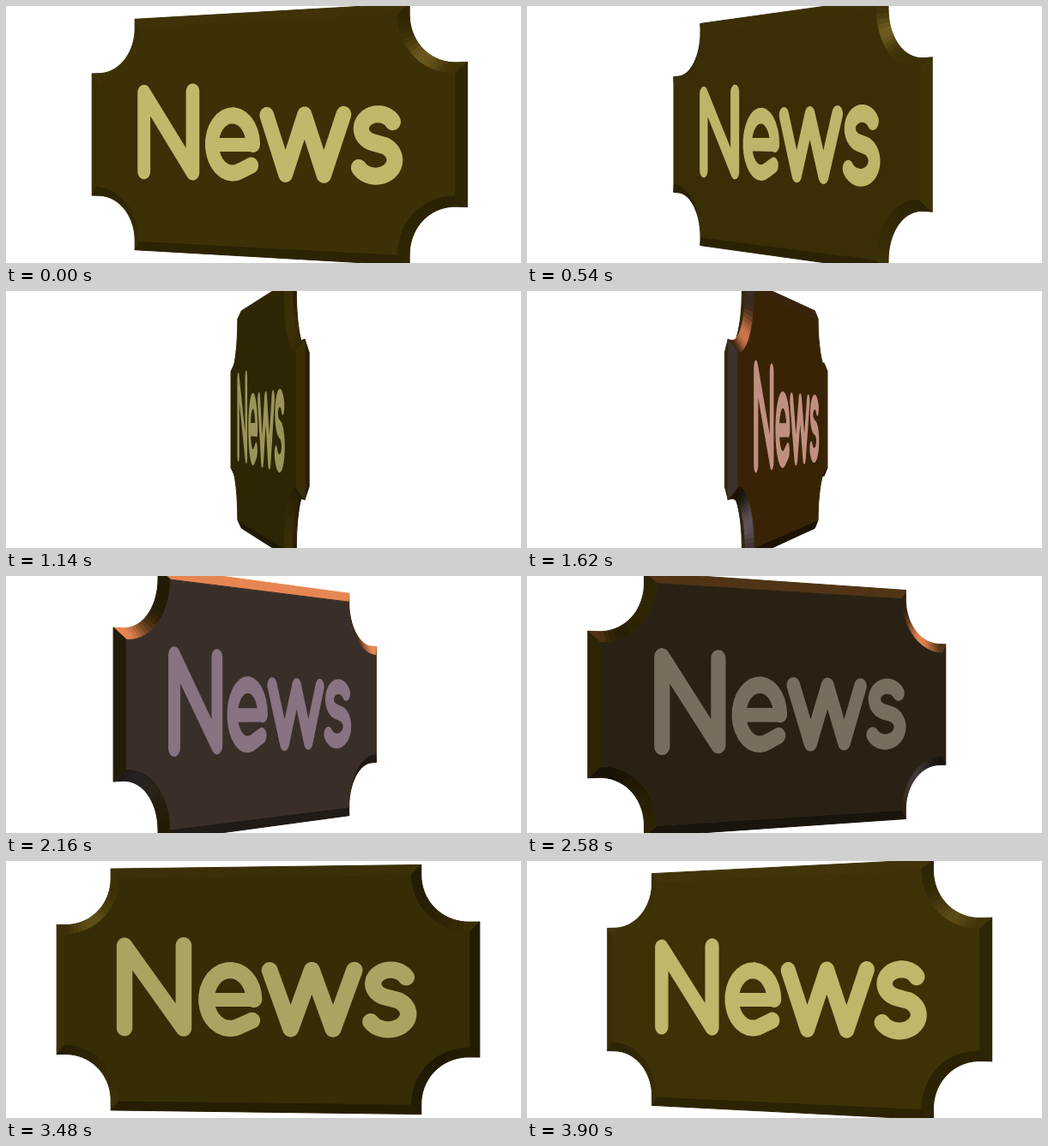
An HTML page with a canvas that plays this animation: 600 by 300 pixels, repeating every 3.96 s.

```html
<!DOCTYPE html>
<html lang="en">
<head>
<meta charset="utf-8">
<title>News</title>
<style>
html, body { margin: 0; width: 100%; height: 100%; overflow: hidden; background: #fff; }
canvas { display: block; }
</style>
</head>
<body>
<canvas id="stage" width="600" height="300" role="img" aria-label="News">News</canvas>
<script>
const ctx = document.getElementById('stage').getContext('2d');
const STEP = 60, STEPS = 66, START = 29;

// Plaque: half width, half height, notch radius, bevel width, half thickness
const W = 248.2, H = 143.2, NOTCH = 54, BEVEL = 12, T = 6.7;
const CX = 300, CY = 150, PERSPECTIVE = 1 / 1389;

const RAD = Math.PI / 180;
const norm = v => { const l = Math.hypot(...v); return v.map(a => a / l); };
const dot = (a, b) => a[0] * b[0] + a[1] * b[1] + a[2] * b[2];

function arc(cx, cy, rx, ry, from, to, n = 24) {
  return Array.from({ length: n + 1 }, (_, i) => {
    const a = (from + (to - from) * i / n) * RAD;
    return [cx + rx * Math.cos(a), cy + ry * Math.sin(a)];
  });
}

// Outline with a quarter-circle notch at each corner
function ring(inset, z) {
  const r = NOTCH + inset, cx = W - BEVEL, cy = H - BEVEL;
  const corner = [[cx - r, H - inset], ...arc(cx, cy, r, r, 180, 270, 18), [W - inset, cy - r]];
  const place = (pts, sx, sy) => pts.map(([x, y]) => [sx * x, sy * y, z]);
  const reversed = [...corner].reverse();
  return [...place(corner, 1, -1), ...place(reversed, 1, 1),
    ...place(corner, -1, 1), ...place(reversed, -1, -1)];
}

const rim = ring(0, 0), face = ring(BEVEL, T);

function facets(inner, side) {
  return rim.map((p, i) => {
    const j = (i + 1) % rim.length;
    const quad = [p, rim[j], inner[j], inner[i]];
    const u = [0, 1, 2].map(k => quad[2][k] - quad[0][k]);
    const v = [0, 1, 2].map(k => quad[3][k] - quad[1][k]);
    let n = norm([u[1] * v[2] - u[2] * v[1], u[2] * v[0] - u[0] * v[2], u[0] * v[1] - u[1] * v[0]]);
    if (n[2] * side < 0) n = n.map(a => -a);
    return { quad, n, side };
  });
}
const bevels = [facets(ring(BEVEL, -T), -1), facets(face, 1)];

// Lettering: centre lines drawn with a round pen
const TOP = -22.3, BASE = 45.5, CAP = -51.7, PEN = 9.5;
const lines = [
  { pts: [[-164, BASE], [-164, CAP], [-93.3, BASE], [-93.3, CAP]] },
  { pts: [[-64, 12], [-9, 12]], pen: 8 },
  { pts: [...arc(-38.3, 11.5, 28, 34, 0, -295), [-12.5, 36]] },
  { pts: [0, 1, 2, 3, 4].map(i => [8 + i * 24.5, i % 2 ? BASE : TOP]) },
  { pts: [...arc(147.5, -6.5, 20, 16, -28, -250), ...arc(144.5, 28, 23, 18, -60, 150)] }
];

function capsule([x0, y0], [x1, y1], pen) {
  const dir = Math.atan2(y1 - y0, x1 - x0) / RAD;
  return [...arc(x1, y1, pen, pen, dir - 90, dir + 90, 12), ...arc(x0, y0, pen, pen, dir + 90, dir + 270, 12)]
    .map(([x, y]) => [x, y, T]);
}
const strokes = lines.flatMap(({ pts, pen = PEN }) =>
  pts.slice(1).map((p, i) => capsule(pts[i], p, pen)));

// Each light: direction, sharpness, its colour on the wood and on the letters
const lights = [
  { dir: [-0.6, 0.3, 0.74], power: 1, wood: [53, 43, 5], paint: [164, 164, 75] },
  { dir: [-0.28, 0.26, 0.92], power: 80, wood: [170, 145, 85], paint: [0, 0, 0] },
  { dir: [0.72, 0.45, 0.53], power: 30, wood: [220, 125, 84], paint: [0, 0, 0] },
  { dir: [0.72, -0.22, 0.66], power: 30, wood: [85, 75, 90], paint: [180, 163, 188] },
  { dir: [1, 0, -0.2], power: 6, wood: [80, 50, 8], paint: [266, 190, 158] }
].map(light => ({ ...light, dir: norm(light.dir) }));
const ambient = { wood: [8, 6, 0], paint: [37, 31, 37] };

function shade(n, material) {
  const c = [...ambient[material]];
  for (const light of lights) {
    const s = Math.max(0, dot(n, light.dir)) ** light.power;
    light[material].forEach((v, i) => c[i] += v * s);
  }
  return `rgb(${c.map(v => Math.round(Math.min(255, v)))})`;
}

function draw(step) {
  const angle = ((START + step * 180 / STEPS + 90) % 180 - 90) * RAD;
  const c = Math.cos(angle), s = Math.sin(angle);
  const turn = ([x, y, z]) => [x * c - z * s, y, x * s + z * c];
  const project = p => {
    const [x, y, z] = turn(p), k = 1 / (1 - z * PERSPECTIVE);
    return [CX + x * k, CY + y * k];
  };
  const trace = pts => {
    pts.forEach((p, i) => ctx[i ? 'lineTo' : 'moveTo'](...p));
    ctx.closePath();
  };
  const paint = (color, polygons, edge) => {
    ctx.fillStyle = ctx.strokeStyle = color;
    ctx.beginPath();
    polygons.forEach(trace);
    ctx.fill();
    if (edge) ctx.stroke();
  };
  const area = pts => pts.reduce((sum, [x, y], i) => {
    const [u, v] = pts[(i + 1) % pts.length];
    return sum + x * v - u * y;
  }, 0);
  const depth = f => f.quad.reduce((sum, p) => sum + turn(p)[2], 0);
  const lit = (n, material) => {
    const [x, y, z] = turn(n);
    return shade([x, -y, z], material);
  };

  ctx.clearRect(0, 0, 600, 300);
  ctx.lineJoin = 'round';
  for (const bevel of bevels) {
    for (const f of [...bevel].sort((a, b) => depth(a) - depth(b))) {
      const pts = f.quad.map(project);
      if (area(pts) * f.side > 0) paint(lit(f.n, 'wood'), [pts], true);
    }
  }
  paint(lit([0, 0, 1], 'wood'), [face.map(project)], true);
  paint(lit([0, 0, 1], 'paint'), strokes.map(pts => pts.map(project)));
}

const begin = performance.now();
function tick() {
  draw(Math.floor((performance.now() - begin) / STEP) % STEPS);
  requestAnimationFrame(tick);
}
tick();
</script>
</body>
</html>
```
